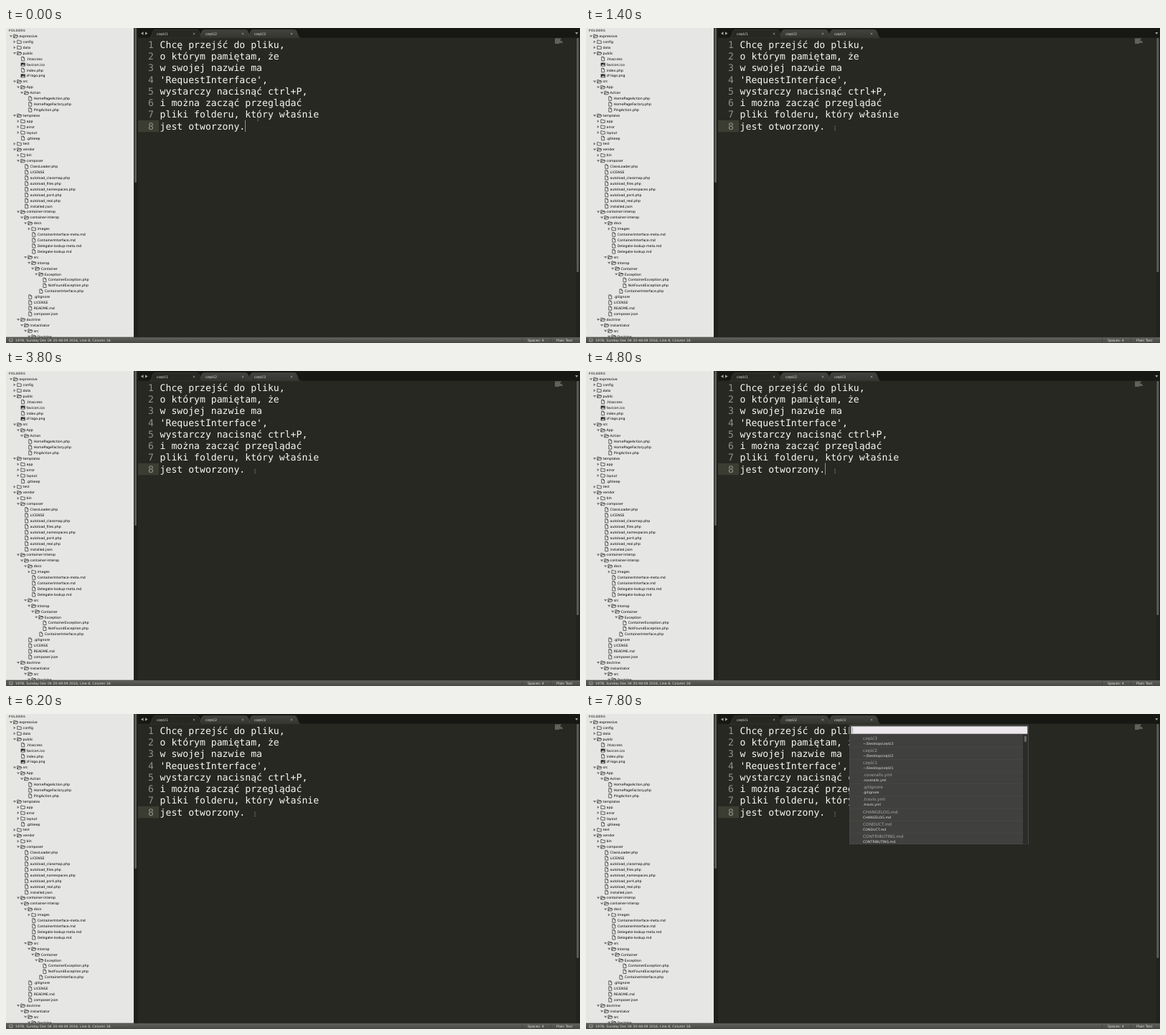
An HTML page for the animation above (8 s loop, 800x440 px).

```html
<!DOCTYPE html>
<html lang="pl">
<head>
<meta charset="utf-8">
<title>Editor</title>
<style>
  html, body { margin: 0; width: 100%; height: 100%; overflow: hidden; background: #272822; }
  svg { display: block; width: 800px; height: 440px; }
  text { font: 4.71px "DejaVu Sans", sans-serif; text-rendering: geometricPrecision; white-space: pre; }
  .code { font: 13.15px "DejaVu Sans Mono", monospace; fill: #f8f8f2; }
  .number { fill: #8f908a; }
  .heading { font-size: 4.5px; font-weight: bold; fill: #666; }
  .title { font-size: 5.85px; fill: #a8a8a8; }
  .light { fill: #e4e4e0; }
  .icon { fill: none; stroke: #2a2a2a; stroke-width: .7; stroke-linejoin: round; }
</style>
</head>
<body>
<svg id="stage" viewBox="0 0 800 440" xmlns="http://www.w3.org/2000/svg">
  <defs>
    <linearGradient id="statusFill" x2="0" y2="1">
      <stop offset="0" stop-color="#62625f"/><stop offset="1" stop-color="#474745"/>
    </linearGradient>
    <linearGradient id="tabFill" x2="0" y2="1">
      <stop offset="0" stop-color="#42433e"/><stop offset="1" stop-color="#343530"/>
    </linearGradient>
  </defs>
</svg>
<script>
const LOOP = 8000, STEP = 200, BLINK = 1200;
const ROW = 19 / 2.4, LINE = 39 / 2.4, ITEM = 41 / 2.4;
const stage = document.getElementById('stage');

// depth, kind (- open folder, + closed folder, f file, i image), label
const tree = `0- expressive
1+ config
1+ data
1- public
2f .htaccess
2i favicon.ico
2f index.php
2i zf-logo.png
1- src
2- App
3- Action
4f HomePageAction.php
4f HomePageFactory.php
4f PingAction.php
1- templates
2+ app
2+ error
2+ layout
2f .gitkeep
1+ test
1- vendor
2+ bin
2- composer
3f ClassLoader.php
3f LICENSE
3f autoload_classmap.php
3f autoload_files.php
3f autoload_namespaces.php
3f autoload_psr4.php
3f autoload_real.php
3f installed.json
2- container-interop
3- container-interop
4- docs
5+ images
5f ContainerInterface-meta.md
5f ContainerInterface.md
5f Delegate-lookup-meta.md
5f Delegate-lookup.md
4- src
5- Interop
6- Container
7- Exception
8f ContainerException.php
8f NotFoundException.php
7f ContainerInterface.php
4f .gitignore
4f LICENSE
4f README.md
4f composer.json
2- doctrine
3- instantiator
4- src
5- Doctrine`.split('\n');

const code = [
  'Chcę przejść do pliku,', 'o którym pamiętam, że', 'w swojej nazwie ma', "'RequestInterface',",
  'wystarczy nacisnąć ctrl+P,', 'i można zacząć przeglądać', 'pliki folderu, który właśnie', 'jest otworzony.'
];
const tabs = ['część1', 'część2', 'część3'];
const files = ['część3', 'część2', 'część1', '.coveralls.yml', '.gitignore', '.travis.yml',
  'CHANGELOG.md', 'CONDUCT.md', 'CONTRIBUTING.md'];

function add(parent, tag, attrs, content) {
  const node = document.createElementNS('http://www.w3.org/2000/svg', tag);
  for (const key in attrs) node.setAttribute(key, attrs[key]);
  if (content) node.textContent = content;
  return parent.appendChild(node);
}
const group = (parent, x = 0, y = 0) => add(parent, 'g', { transform: `translate(${x} ${y})` });
const rect = (parent, x, y, width, height, fill, more) =>
  add(parent, 'rect', { x, y, width, height, fill, ...more });
const text = (parent, x, y, content, cls = '') => add(parent, 'text', { x, y, class: cls }, content);
const path = (parent, d, attrs) => add(parent, 'path', { d, ...attrs });

const icons = {
  '-': 'M.7 2.2V-2.2H2.8L3.4-1.4H5.6V-.4M.7 2.2L2-.4H6.9L5.6 2.2Z',
  '+': 'M.7-2.2H2.8L3.4-1.4H6.2V2.2H.7Z',
  f: 'M1.6-2.8H4L5.6-1.2V2.8H1.6ZM4-2.8V-1.2H5.6'
};

function drawTreeRow(parent, entry, index) {
  const depth = +entry[0], kind = entry[1];
  const row = group(parent, 5.04 * depth, 11.4 + ROW * index);
  if (kind === '-') path(row, 'M4.8-1.2H9.2L7 1.7Z', { fill: '#777' });
  if (kind === '+') path(row, 'M5.6-2L8.5 0L5.6 2Z', { fill: '#777' });
  const icon = group(row, 10, 0);
  if (kind === 'i') {
    rect(icon, .6, -2.4, 6, 4.8, '#1c1c1c');
    path(icon, 'M1.2 1.7L2.9-.4L4 .7L4.9-.2L6 1.7Z', { fill: '#e6e6e6' });
    add(icon, 'circle', { cx: 4.9, cy: -1.3, r: .5, fill: '#e6e6e6' });
  } else {
    path(icon, icons[kind], { class: 'icon' });
  }
  text(row, 18.5, 1.6, entry.slice(3));
}

function drawSidebar() {
  rect(stage, 0, 0, 178, 432, '#e6e6e4');
  text(stage, 3.7, 5.3, 'FOLDERS', 'heading');
  tree.forEach((entry, i) => drawTreeRow(stage, entry, i));
  rect(stage, 178, 0, 6, 432, '#20211d');
  rect(stage, 179, 0, 3, 216, '#5b5c58', { rx: 1.2 });
}

function drawTab(label, index) {
  const active = index === 0, tab = group(stage, 68 * index, 0);
  path(tab, 'M200 14C204 13.5 203 2.5 208 2.5H266C271 2.5 270 13.5 274 14Z', {
    fill: active ? '#272822' : 'url(#tabFill)', stroke: active ? '#4b4c47' : '#50514c', 'stroke-width': .5
  });
  text(tab, 210, 9.5, label, 'light');
  path(tab, 'M260.7 6.8l2.6 2.6m0-2.6l-2.6 2.6', { stroke: '#a0a09c', 'stroke-width': .7 });
}

function drawEditor() {
  rect(stage, 184, 0, 616, 14, '#171814');
  path(stage, 'M191.5 5.2V9.8L188 7.5ZM194 5.2V9.8L197.5 7.5ZM793.3 6H797.3L795.3 9Z', { fill: '#a3a4a0' });
  for (let i = tabs.length - 1; i >= 0; i--) drawTab(tabs[i], i);
  rect(stage, 184, 13.6, 616, 1, '#272822');
  rect(stage, 184, 129, 29, 16.25, '#3c3d32');
  code.forEach((line, i) => {
    const y = 27.8 + LINE * i;
    text(stage, 198, y, String(i + 1), 'code number');
    text(stage, 214.6, y, line, 'code');
    rect(stage, 765, 14.6 + .95 * i, line.length * .4, .6, '#b9bab3', { opacity: .65 });
  });
  rect(stage, 794.5, 14, 5.5, 418, '#22231e');
  rect(stage, 795.3, 14, 3, 327, '#5b5c58', { rx: 1.2 });
}

function drawStatus() {
  rect(stage, 0, 432, 800, 8, 'url(#statusFill)');
  rect(stage, 0, 431.7, 800, .5, '#2b2b29');
  path(stage, 'M4.6 434.2H9.2V438H4.6ZM4.6 437H9.2', { fill: 'none', stroke: '#c8c8c4', 'stroke-width': .5 });
  text(stage, 13, 437.8, '197B, Sunday Dec 04 20:48:09 2016, Line 8, Column 16', 'light');
  text(stage, 727, 437.8, 'Spaces: 4', 'light');
  text(stage, 767, 437.8, 'Plain Text', 'light');
  for (const x of [719, 759]) rect(stage, x, 432.4, .5, 7.6, '#3a3a38');
}

function drawPointer() {
  const pointer = group(stage);
  for (const y of [-2.6, 0, 2.6]) rect(pointer, -.5, y - .5, 1, 1, '#b4b5ae');
  return pointer;
}

function drawPanel() {
  const panel = group(stage);
  rect(panel, 367, 15, 250, 167, '#40403f');
  rect(panel, 367.3, 15.3, 249.4, 166.4, 'none', { stroke: '#4d4d4b', 'stroke-width': .6 });
  rect(panel, 369.5, 17.3, 245.7, 10.4, '#ece8ec');
  rect(panel, 371, 18.6, .5, 7.8, '#555');
  files.forEach((name, i) => {
    const y = ITEM * i;
    if (i) rect(panel, 368, 29.1 + y, 241, .5, '#4b4b49');
    text(panel, 386, 36 + y, name, 'title');
    text(panel, 386, 43 + y, i < 3 ? '~/Desktop/' + name : name, 'light');
  });
  rect(panel, 609, 29, 7, 152.5, '#2b2b2a');
  rect(panel, 610.8, 30.5, 3.2, 8.5, '#676765', { rx: 1.2 });
  return panel;
}

drawSidebar();
drawEditor();
drawStatus();
const caret = rect(stage, 333, 128.5, 1, 16.5, '#f8f8f0');
const pointer = drawPointer();
const panel = drawPanel();

function render(time) {
  const t = time % LOOP;
  const blinkStep = Math.floor((t + BLINK - 800) % BLINK / STEP);
  caret.setAttribute('opacity', [.5, .85, .5][blinkStep] || 0);
  pointer.setAttribute('transform', t < 200 ? 'translate(351 127)' : 'translate(347 140)');
  panel.setAttribute('visibility', t >= 7800 ? 'visible' : 'hidden');
}

const start = performance.now();
function tick() {
  render(performance.now() - start);
  requestAnimationFrame(tick);
}
tick();
</script>
</body>
</html>
```
